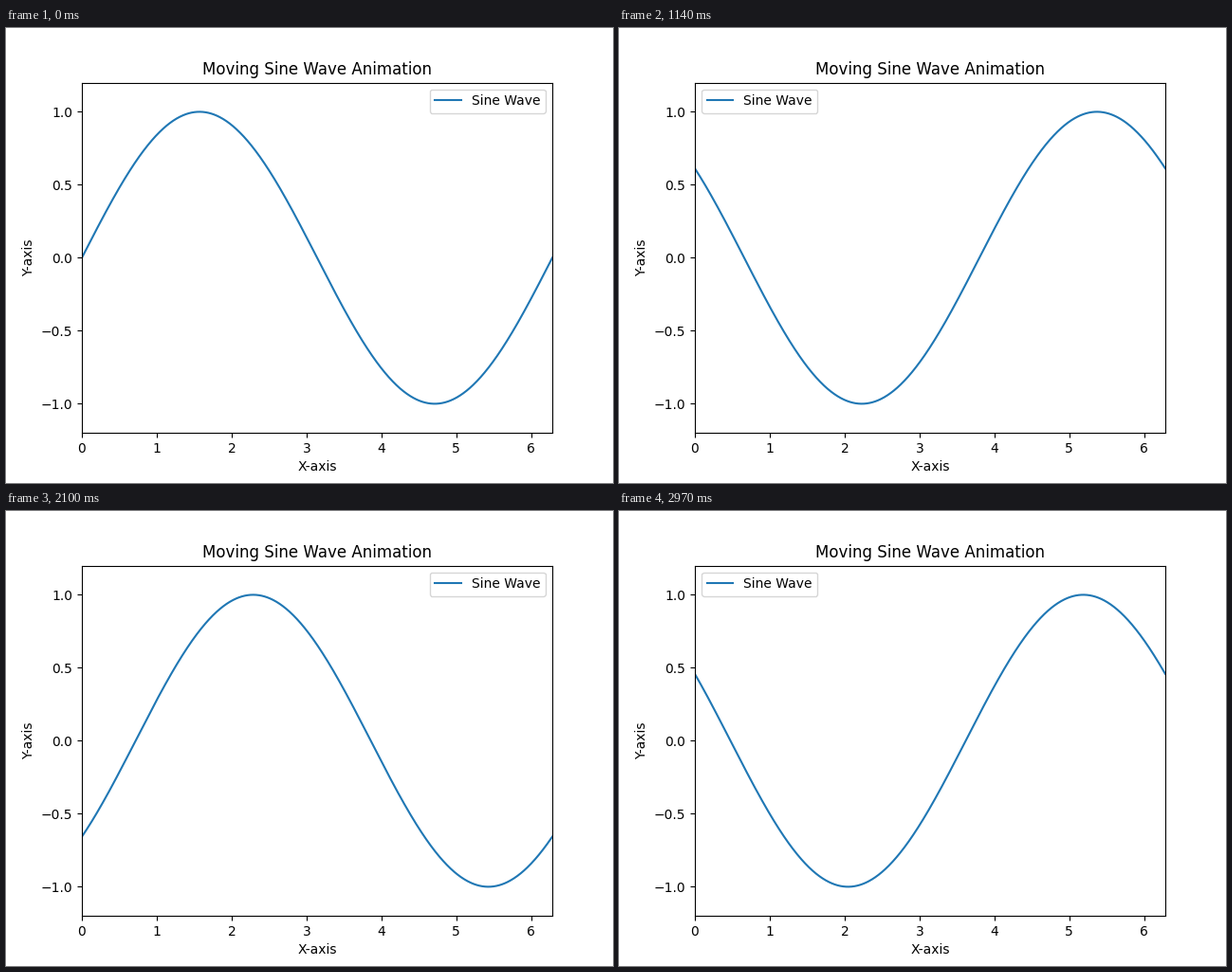
Write a matplotlib script that moves like this. It is 640x480 px and loops after 3000 ms.

```python
import numpy as np
import matplotlib.pyplot as plt
from matplotlib.animation import FuncAnimation

FRAMES = 100
INTERVAL = 30  # ms
STEP = 0.1  # phase shift per frame, in radians

fig, ax = plt.subplots(figsize=(6.4, 4.8), dpi=100)
x = np.linspace(0, 2 * np.pi, 1000)
line, = ax.plot(x, np.sin(x), label="Sine Wave")

ax.set_xlim(0, 2 * np.pi)
ax.set_ylim(-1.2, 1.2)
ax.set_title("Moving Sine Wave Animation")
ax.set_xlabel("X-axis")
ax.set_ylabel("Y-axis")
# "best" moves the legend to whichever corner the wave leaves free
ax.legend(loc="best")


def update(i):
    line.set_ydata(np.sin(x - STEP * i))
    return line,


anim = FuncAnimation(fig, update, frames=FRAMES, interval=INTERVAL,
                     init_func=lambda: update(0), repeat=True,
                     repeat_delay=0, blit=False)
plt.show()
```
